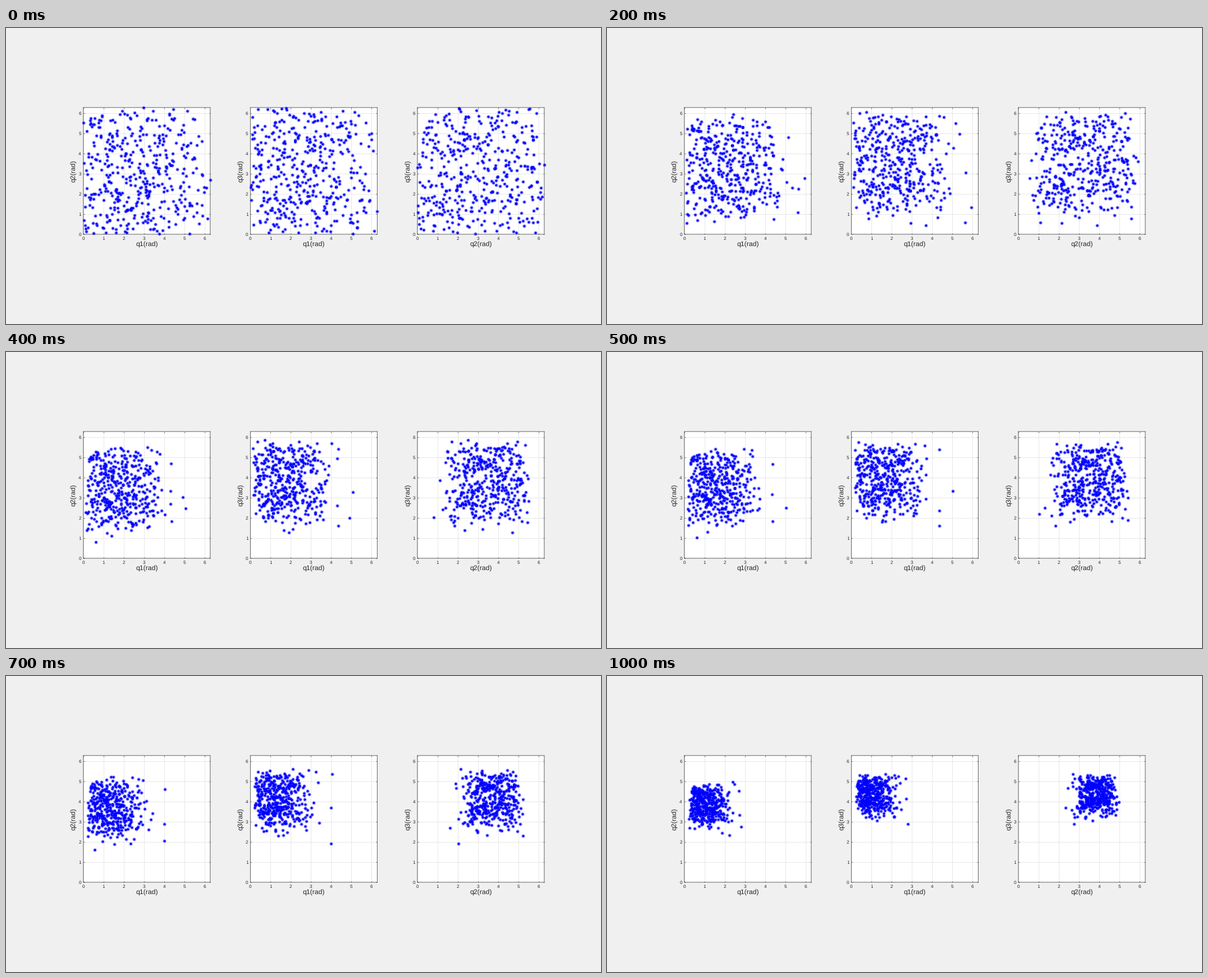
Animation of 1060x528 px, one loop 1100 ms. Source, as a matplotlib script:

```python
import numpy as np
import matplotlib.pyplot as plt
from matplotlib.animation import FuncAnimation

W, H, DPI = 1060, 528, 100
PX = 72 / DPI                       # one pixel in points
FRAMES, STEP = 11, 100
COUNT = 420
TAU = 2 * np.pi
UNIT = 35.97                        # pixels per radian
BASE = 367.9                        # y of the lower axis, from the top
SIDE = TAU * UNIT
INK = "#262626"
GOAL = np.array([0.4, 4.17, 4.85])

plt.rcParams["font.family"] = "Liberation Sans"
plt.rcParams["text.hinting"] = "none"


def swarm():
    """Positions [frame, particle, joint] of a cloud contracting to GOAL."""
    rng = np.random.default_rng(12)
    pos = TAU * rng.beta((1.25, 1.12, 1.15), (1.6, 1.2, 1.15), (COUNT, 3))
    path = [pos]
    for _ in range(FRAMES - 1):
        rate = rng.uniform(0.01, 0.22, (COUNT, 1))
        pos = pos + rate * (GOAL - pos) + rng.normal(0, 0.025, pos.shape)
        pos = np.clip(pos, 0, TAU)
        path.append(pos)
    return np.array(path)


def stray(offset, scales):
    """A slow particle: its offset from GOAL shrinks by the given scales."""
    keys = [0, 1, 2, 4, 6, 8, 10]
    scale = np.interp(np.arange(FRAMES), keys, scales)
    return np.clip(GOAL + scale[:, None] * np.array(offset), 0, TAU)


cloud = swarm()
cloud[:, 0] = stray((5.22, -3.08, -4.26), (1.1, 1, 1, 0.76, 0.76, 0.62, 0.46))
cloud[:, 1] = stray((5.55, -1.4, -3.51), (1.06, 1.03, 1, 0.815, 0.607, 0.48, 0.33))
cloud[:, 2] = stray((0.23, -3.37, -2.83), (1.08, 1.05, 1.03, 1, 0.87, 0.65, 0.45))

fig = plt.figure(figsize=(W / DPI, H / DPI), dpi=DPI, facecolor="#f0f0f0")


def label(x, y, text, size, **kw):
    fig.text(x / W, 1 - y / H, text, fontsize=size * PX, color=INK, **kw)


def panel(left, xname, yname):
    ax = fig.add_axes([left / W, 1 - BASE / H, SIDE / W, SIDE / H])
    ax.set(xlim=(0, TAU), ylim=(0, TAU), xticks=range(7), yticks=range(7))
    ax.set_axisbelow(True)
    ax.grid(color="#e2e2e2", lw=0.8 * PX)
    ax.tick_params(direction="in", top=True, right=True, length=2.3 * PX,
                   width=0.7 * PX, color=INK, labelbottom=False, labelleft=False)
    for spine in ax.spines.values():
        spine.set(color="#606060", linewidth=PX, snap=False)
    for n in range(7):
        label(left + n * UNIT, 378.2, str(n), 8.2, ha="center", va="baseline")
        label(left - 4, BASE - n * UNIT + 2.9, str(n), 8.2, ha="right", va="baseline")
    label(left + SIDE / 2, 386.3, xname + "(rad)", 12.2, ha="center", va="center")
    label(left - 16.5, BASE - SIDE / 2, yname + "(rad)", 12.2,
          ha="center", va="center", rotation=90)
    dots, = ax.plot([], [], ls="", marker=(8, 2, 0), ms=5.8 * PX, mew=0.6 * PX,
                    color="#0000ff", clip_on=False, zorder=5, snap=False)
    return dots


PAIRS = [(0, 1), (0, 2), (1, 2)]
plots = [panel(left, f"q{i + 1}", f"q{j + 1}")
         for left, (i, j) in zip((137.8, 435.4, 732.9), PAIRS)]


def draw(frame):
    for dots, (i, j) in zip(plots, PAIRS):
        dots.set_data(cloud[frame, :, i], cloud[frame, :, j])
    return plots


anim = FuncAnimation(fig, draw, frames=FRAMES, interval=STEP,
                     repeat=True, repeat_delay=0, blit=False)
plt.show()
```
